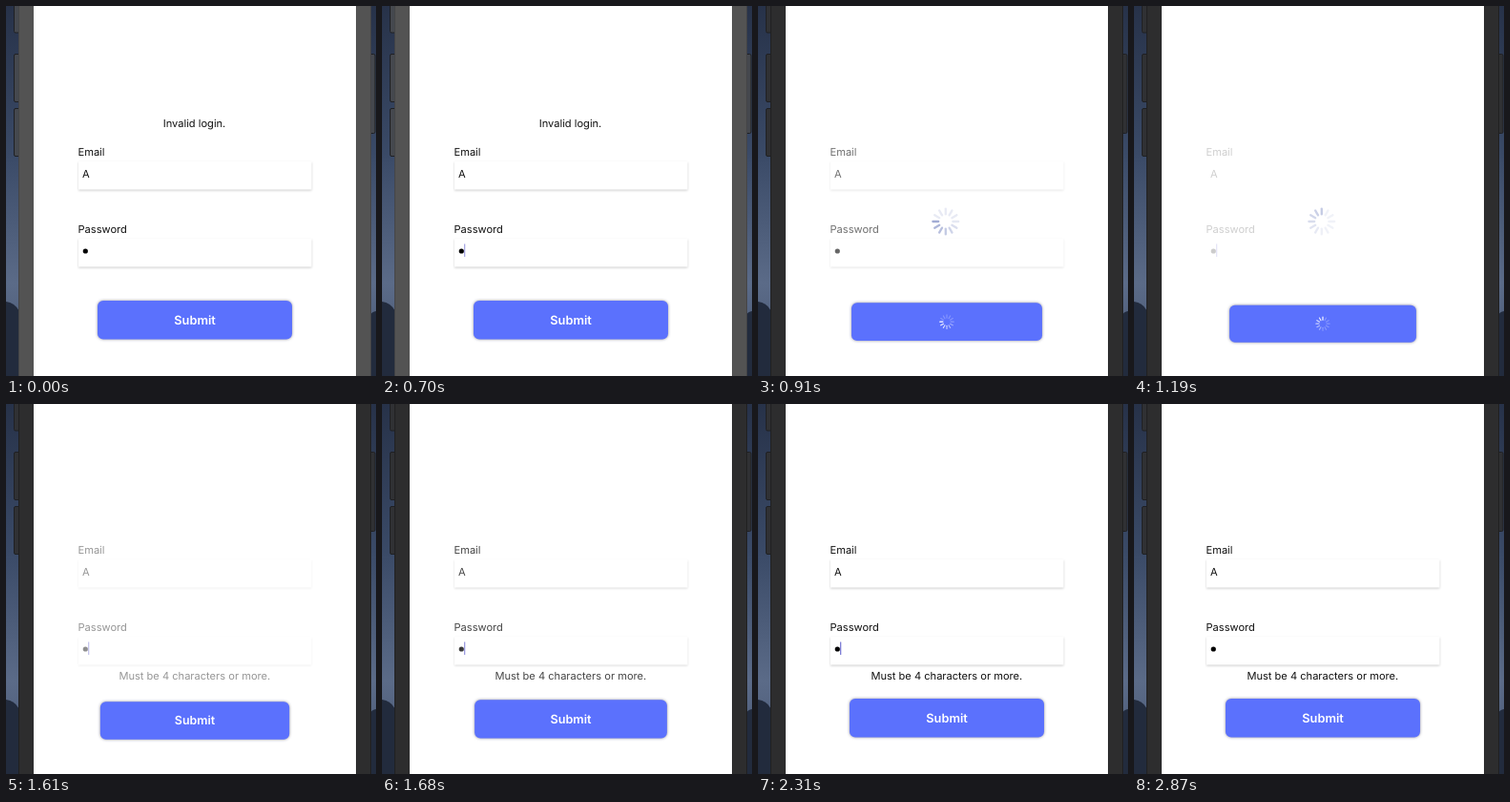
These frames come from a looping animation (388 by 388 pixels, 3010 ms). An HTML page:

```html
<!DOCTYPE html>
<html lang="en">
<head>
<meta charset="utf-8">
<title>Login form</title>
<style>
  html, body { margin: 0; width: 100%; height: 100%; overflow: hidden; background: #fff; }
  svg { display: block; width: 100vw; height: 100vh; }
  text {
    font: 11.1px Inter, "Open Sans", sans-serif;
    text-rendering: geometricPrecision;
    fill: #111;
  }
  .mid { text-anchor: middle; }
  #label { font-size: 12.8px; font-weight: 600; fill: #fff; }
  .field { fill: #fff; filter: drop-shadow(0 1.5px 1px rgba(0, 0, 0, .2)); }
  #plate { fill: #5b71fd; filter: drop-shadow(0 .6px 1.5px rgba(20, 20, 60, .5)); }
  .key { stroke: #1f2023; stroke-width: 1; }
</style>
</head>
<body>
<svg viewBox="0 0 388 388">
  <defs>
    <linearGradient id="sky" x1="0" y1="0" x2="0" y2="1">
      <stop offset="0" stop-color="#273249"/>
      <stop offset=".4" stop-color="#3a4a67"/>
      <stop offset=".75" stop-color="#5b6b88"/>
      <stop offset="1" stop-color="#465470"/>
    </linearGradient>
  </defs>
  <rect width="388" height="388" fill="url(#sky)"/>
  <path d="M0 310Q9 311 14 320V388H0ZM388 320Q384 320 380 326V388H388Z" fill="#222b3d"/>
  <g id="keys">
    <rect class="key" x="8.5" y="-4" width="8" height="32" rx="1.5"/>
    <rect class="key" x="8.5" y="50.5" width="8" height="50" rx="1.5"/>
    <rect class="key" x="8.5" y="107.5" width="8" height="50" rx="1.5"/>
    <rect class="key" x="378" y="50.5" width="9" height="83" rx="1.5"/>
  </g>
  <rect id="bezel" x="13.5" y="-2" width="369" height="392"/>
  <rect x="29" width="338" height="388" fill="#fff"/>

  <g id="fields">
    <rect class="field" x="76" y="163" width="244.5" height="29.5"/>
    <rect class="field" x="76" y="244" width="244.5" height="29.5"/>
  </g>
  <g id="form">
    <text id="invalid" class="mid" x="197.5" y="126.5">Invalid login.</text>
    <text x="75.5" y="157">Email</text>
    <text x="80" y="180">A</text>
    <text x="75.5" y="238">Password</text>
    <circle cx="83.3" cy="257" r="2.6" fill="#000"/>
    <rect id="caret" x="86" y="249.5" width="1.3" height="13.5" fill="#7f7fd6"/>
    <text id="short" class="mid" x="197.8" y="289">Must be 4 characters or more.</text>
  </g>
  <g id="wait" transform="translate(196.8 226)" stroke="#6576b8"></g>
  <g id="button">
    <rect id="plate" x="-102" y="-20.3" width="204" height="40.6" rx="6"/>
    <text id="label" class="mid" y="4.6">Submit</text>
    <g id="busy" stroke="#fff"></g>
  </g>
</svg>
<script>
const LOOP = 3010, STEP = 70, SPOKES = 12;
const $ = id => document.getElementById(id);

// [ms, value] steps, joined by straight lines
const press = [[700, 0], [770, .06], [840, .25], [910, .5], [980, .75], [1050, .92], [1120, 1],
               [1540, 1], [1610, .7], [1680, .28], [1750, .06], [1820, 0]];
const caretOn = [[70, 0], [210, 1], [630, 1], [840, 0], [1050, 0], [1190, 1],
                 [1680, 1], [1820, 0], [2100, 0], [2310, 1], [2660, 1], [2870, 0]];
const waitOn = [[700, 0], [770, .1], [910, .6], [1120, .5], [1190, .38], [1330, 0]];

function at(track, t) {
  if (t <= track[0][0]) return track[0][1];
  for (let i = 1; i < track.length; i++) {
    const [t0, v0] = track[i - 1], [t1, v1] = track[i];
    if (t <= t1) return v0 + (v1 - v0) * (t - t0) / (t1 - t0);
  }
  return track[track.length - 1][1];
}

function makeSpinner(group, inner, outer, width) {
  return Array.from({ length: SPOKES }, (_, i) => {
    const line = document.createElementNS("http://www.w3.org/2000/svg", "line");
    const set = { y1: -inner, y2: -outer, "stroke-width": width,
                  "stroke-linecap": "round", transform: `rotate(${i * 360 / SPOKES})` };
    for (const k in set) line.setAttribute(k, set[k]);
    group.append(line);
    return line;
  });
}

function spin(spokes, t) {
  const head = Math.floor(Math.max(0, t - 700) / (1000 / SPOKES) + 7);
  spokes.forEach((s, i) => {
    const age = ((head - i) % SPOKES + SPOKES) % SPOKES;
    s.setAttribute("opacity", Math.max(.25, 1 - age * .12));
  });
}

const big = makeSpinner($("wait"), 7.6, 13.4, 2.3);
const small = makeSpinner($("busy"), 4.2, 7.4, 1.2);
const show = (id, v) => $(id).setAttribute("opacity", +v);

function draw(time) {
  const t = Math.floor(time % LOOP / STEP) * STEP;
  const p = at(press, t);
  const loading = t >= 770 && t < 1610;
  const light = t < 770;

  $("bezel").setAttribute("fill", light ? "#535353" : "#2d2d2e");
  $("bezel").setAttribute("stroke", light ? "#454547" : "#202021");
  $("keys").setAttribute("fill", light ? "#45484e" : "#303134");
  show("fields", 1 - p);
  show("form", 1 - .8 * p);
  show("invalid", light);
  show("short", t >= 1610);
  show("caret", at(caretOn, t));
  show("wait", at(waitOn, t));
  show("label", !loading);
  show("busy", loading);
  $("button").setAttribute("transform", `translate(198 ${329.2 + 4 * p}) scale(${1 - .04 * p})`);

  const turn = Math.min(t, 1470);
  spin(big, turn);
  spin(small, turn);
}

const start = performance.now();
function tick() {
  draw(performance.now() - start);
  requestAnimationFrame(tick);
}
tick();
</script>
</body>
</html>
```
